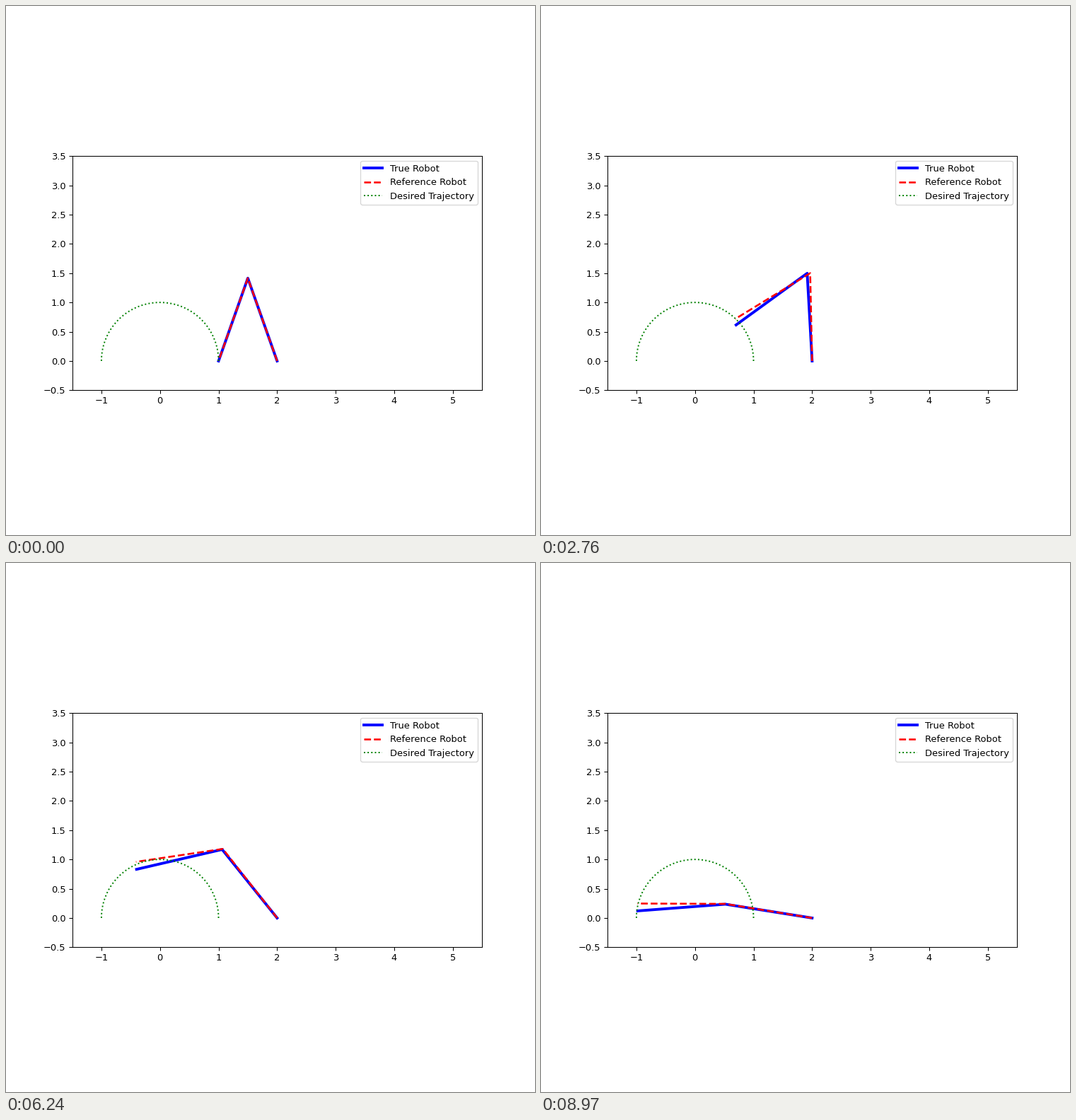
A matplotlib script for the animation above (9000 ms loop, 748 by 748 pixels).

```python
import numpy as np
import matplotlib.pyplot as plt
from matplotlib.animation import FuncAnimation

FRAMES, INTERVAL = 300, 30
LINK = 1.5
BASE = np.array([2.0, 0.0])
GAIN = 5.0

theta = np.linspace(0, np.pi, FRAMES)
path = np.column_stack([np.cos(theta), np.sin(theta)])


def inverse(points):
    """Both link angles, measured from vertical towards the left."""
    dx, dy = BASE[0] - points[:, 0], points[:, 1]
    half = np.arccos(np.clip(np.hypot(dx, dy) / (2 * LINK), -1, 1))
    aim = np.arctan2(dx, dy)
    return np.column_stack([aim - half, aim + half])


def follow(goal, gain):
    """First-order lag behind the goal angles."""
    q = goal.copy()
    for i in range(1, len(goal)):
        q[i] = q[i - 1] + gain * (goal[i - 1] - q[i - 1])
    return q


def joints(q):
    steps = LINK * np.stack([-np.sin(q), np.cos(q)], axis=-1)
    elbow = BASE + steps[0]
    return np.array([BASE, elbow, elbow + steps[1]]).T


lagged = follow(inverse(path), GAIN * theta[1])
rise = 1 - np.exp(-theta / 0.1)


def drift(shoulder, elbow):
    """Steady tracking error that builds up after the start."""
    return np.column_stack([shoulder * np.exp(-theta) * rise, elbow * rise])


true_q = lagged + drift(0.06, 0.048)
ref_q = lagged + drift(-0.03, -0.032)

fig, ax = plt.subplots(figsize=(8, 8), dpi=93.5)
ax.set_xlim(-1.5, 5.5)
ax.set_ylim(-0.5, 3.5)
ax.set_aspect("equal")

true_arm, = ax.plot([], [], "b-", lw=3, label="True Robot")
ref_arm, = ax.plot([], [], "r--", lw=2, label="Reference Robot")
ax.plot(path[:, 0], path[:, 1], "g:", label="Desired Trajectory")
ax.legend(loc="upper right")


def update(i):
    true_arm.set_data(*joints(true_q[i]))
    ref_arm.set_data(*joints(ref_q[i]))
    return true_arm, ref_arm


anim = FuncAnimation(fig, update, frames=FRAMES, interval=INTERVAL,
                     repeat=True, repeat_delay=0)
plt.show()
```
